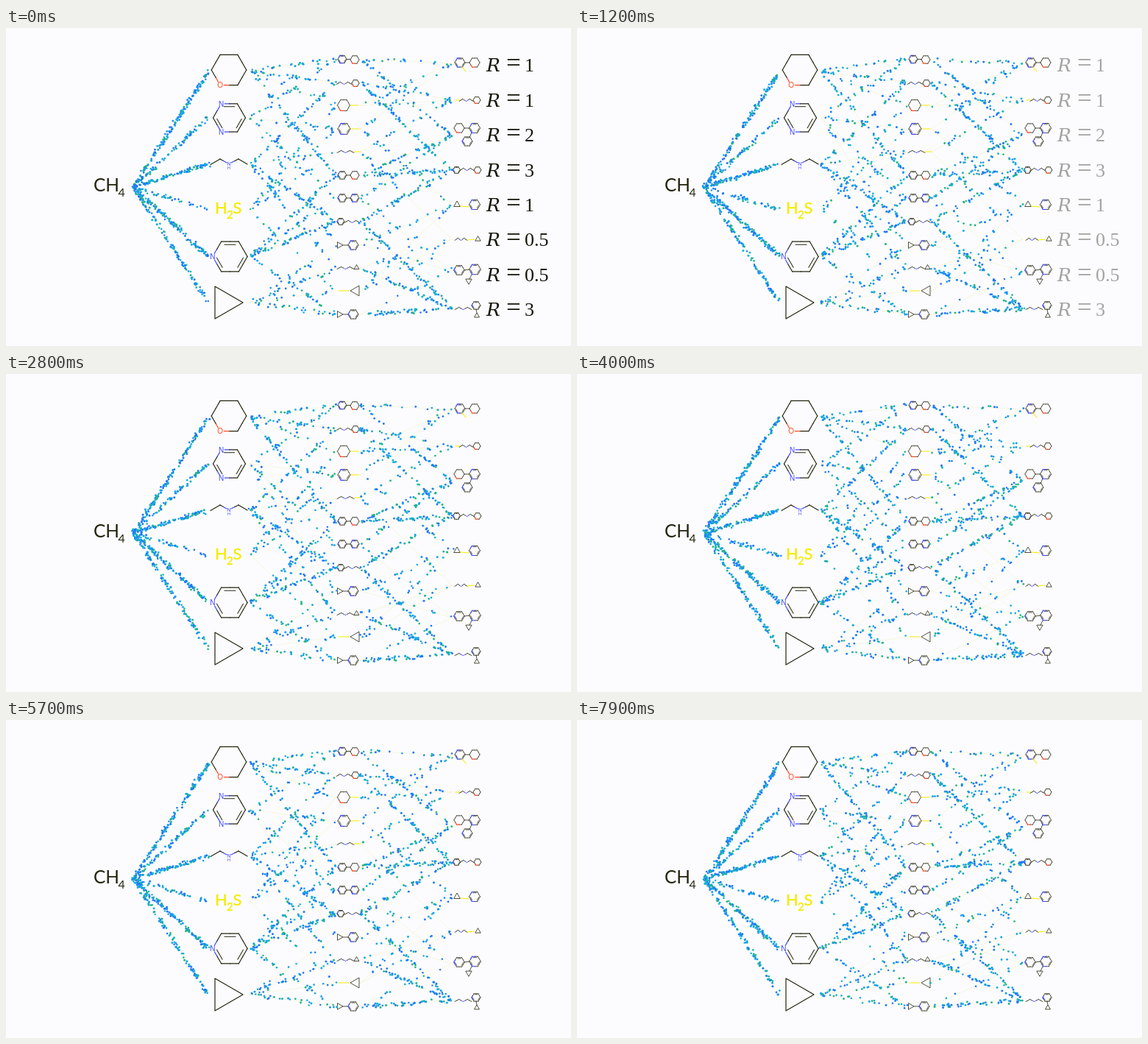
Recreate the animation shown at these times as an HTML page with a canvas. Size 768x432 px, loop 8 s.

```html
<!DOCTYPE html>
<html lang="en">
<head>
<meta charset="utf-8">
<title>Molecule flow network</title>
<style>
  html, body { margin: 0; width: 100%; height: 100%; overflow: hidden; background: #fcfcff; }
  svg, canvas { position: absolute; left: 0; top: 0; width: 768px; height: 432px; }
  .formula { font-family: Lato, "Open Sans", sans-serif; }
  .atom { font-family: "Liberation Sans", Arial, sans-serif; text-anchor: middle; }
  .reward { font-family: "Liberation Serif", Times, serif; font-size: 26px; fill: #17170c; }
  .reward .var { font-family: "DejaVu Serif", serif; font-style: italic; font-size: 25px; }
  .reward .eq { font-size: 35px; }
</style>
</head>
<body>
<svg id="scene" viewBox="0 0 768 432"></svg>
<canvas id="flow" width="768" height="432"></canvas>
<script>
const LOOP = 8000, STEP = 100, FADE = 1950;
const INK = '#25250f', BLUE = '#3b45ff', RED = '#ff4a22', YELLOW = '#f4ec00';
const DOTS = ['#1f78f5', '#1f78f5', '#129cf0', '#12a4ec', '#14b4c8', '#22b487'];

const scene = document.getElementById('scene');
const ctx = document.getElementById('flow').getContext('2d');
const parts = [];

// --- network -------------------------------------------------------------
const rewards = [1, 1, 2, 3, 1, 0.5, 0.5, 3];
const root = { x: 173, y: 216 };
const column = (ys, xin, xout) => ys.map(y => ({ y, xin, xout, flow: 0 }));
const first = column([59, 122, 185, 246, 310, 373], 275, 332);
const second = column(Array.from({ length: 12 }, (_, i) => 42.5 + i * 31.5), 448, 482);
const last = column([48, 98, 145, 193, 240, 287, 331, 381], 606, 606);
const secondParents = [[0, 1], [0, 2], [0, 3], [1, 3], [2, 3], [4, 0],
  [4, 1], [4, 2], [5, 1], [2, 5], [3, 5], [5, 4]];
const lastParents = [[0, 2, 3], [1, 2, 4], [0, 5, 6], [1, 5, 7],
  [3, 8, 10], [4, 9, 10], [6, 8, 11], [7, 9, 11]];

const edges = [];
function connect(from, to, parents) {
  to.forEach((node, i) => parents[i].forEach(p => {
    const flow = node.flow / parents[i].length;
    from[p].flow += flow;
    edges.push({ x1: from[p].xout, y1: from[p].y, x2: node.xin, y2: node.y, flow, guide: true });
  }));
}
last.forEach((node, i) => { node.flow = rewards[i]; });
connect(second, last, lastParents);
connect(first, second, secondParents);
first.forEach(n => edges.push({ x1: root.x, y1: root.y, x2: n.xin, y2: n.y, flow: n.flow }));

// --- particles -----------------------------------------------------------
let seed = 20231;
function rand() {
  seed = (seed * 1664525 + 1013904223) >>> 0;
  return seed / 4294967296;
}
const spread = size => (rand() + rand() - 1) * size;

const particles = edges.flatMap(e => {
  const length = Math.hypot(e.x2 - e.x1, e.y2 - e.y1);
  const count = Math.round(length * e.flow * 0.36);
  return Array.from({ length: count }, () => ({
    e,
    start: rand(),
    pace: (3.4 + rand() * 1.2) / length,
    dx: spread(3.6),
    dy: spread(3.6),
    r: 1.2 + rand() * 0.35,
    color: DOTS[Math.floor(rand() * DOTS.length)]
  }));
});

// --- drawing helpers -----------------------------------------------------
function line(a, b, color = INK, w = 0.8, extra = '') {
  parts.push(`<line x1="${a[0]}" y1="${a[1]}" x2="${b[0]}" y2="${b[1]}" stroke="${color}" stroke-width="${w}" stroke-linecap="round" ${extra}/>`);
}
function text(x, y, str, size, color, cls, extra = '') {
  parts.push(`<text x="${x}" y="${y}" font-size="${size}" fill="${color}" class="${cls}" ${extra}>${str}</text>`);
}
const mix = (a, b, k) => [a[0] + (b[0] - a[0]) * k, a[1] + (b[1] - a[1]) * k];

const kinds = {
  pyran: { atoms: [2], color: RED, label: 'O', doubles: [] },
  pyrimidine: { atoms: [2, 4], color: BLUE, label: 'N', doubles: [0, 2, 4] },
  pyridine: { atoms: [3], color: BLUE, label: 'N', doubles: [0, 2, 4] }
};

function ring(name, x, y, r) {
  const kind = kinds[name], big = r > 15, w = big ? 1.2 : 0.8;
  const corner = (k, s = 1) => {
    const a = k * Math.PI / 3;
    return [x + Math.cos(a) * r * s, y + Math.sin(a) * r * s];
  };
  const isAtom = k => kind.atoms.includes(k % 6);
  const half = (k, mid) => {
    const end = corner(k);
    if (isAtom(k)) line(mix(end, mid, big ? 0.44 : 0), mid, kind.color, big ? w : 1.2);
    else line(end, mid, INK, w);
  };
  for (let k = 0; k < 6; k++) {
    const mid = mix(corner(k), corner(k + 1), 0.5);
    half(k, mid);
    half(k + 1, mid);
    if (kind.doubles.includes(k)) {
      const c = corner(k, 0.8), d = corner(k + 1, 0.8);
      line(mix(c, d, 0.1), mix(c, d, 0.9), INK, w * 0.85);
    }
  }
  if (big) kind.atoms.forEach(k => {
    const [ax, ay] = corner(k);
    text(ax, ay + 3.6, kind.label, 10, kind.color, 'atom');
  });
}

const UP = -Math.PI / 2, DOWN = Math.PI / 2, LEFT = Math.PI;
function triangle(x, y, r, turn = 0) {
  const pts = [0, 1, 2].map(k => {
    const a = turn + k * Math.PI * 2 / 3;
    return `${x + Math.cos(a) * r},${y + Math.sin(a) * r}`;
  });
  parts.push(`<polygon points="${pts.join(' ')}" fill="none" stroke="${INK}" stroke-width="${r > 15 ? 1.2 : 0.8}" stroke-linejoin="round"/>`);
}

// Zigzag with a blue amine in the middle.
function chain(x1, x2, y) {
  const n = 4, at = k => [x1 + (x2 - x1) * k / n, y + (k % 2 ? -1.5 : 1.5)];
  for (let k = 0; k < n; k++) {
    const mid = mix(at(k), at(k + 1), 0.5);
    line(at(k), mid, k === 2 ? BLUE : INK);
    line(mid, at(k + 1), k === 1 ? BLUE : INK);
  }
}
const bond = (x1, y1, x2, y2) => line([x1, y1], [x2, y2]);
const sulfur = (x1, y1, x2, y2) => line([x1, y1], [x2, y2], YELLOW, 1.1);

// --- static picture ------------------------------------------------------
edges.filter(e => e.guide).forEach(e =>
  line([e.x1, e.y1], [e.x2, e.y2], '#ece99a', 0.7, 'stroke-dasharray="0.6 2.4"'));

text(119, 222, 'CH', 24.5, INK, 'formula');
text(152.5, 229, '4', 16, INK, 'formula');
const heavy = `stroke="${YELLOW}" stroke-width="0.4"`;
text(284, 252, 'H', 22, YELLOW, 'formula', heavy);
text(300, 259, '2', 15, YELLOW, 'formula', heavy);
text(308.5, 252, 'S', 22, YELLOW, 'formula', heavy);

ring('pyran', 303, 57, 23.8);
ring('pyrimidine', 303.5, 122, 22);
line([278, 185.5], [291, 178], INK, 1.2);
line([291, 178], [295.5, 180.5], INK, 1.2);
line([295.5, 180.5], [300, 183], BLUE, 1.2);
line([306, 183], [311, 180.5], BLUE, 1.2);
line([311, 180.5], [316, 178], INK, 1.2);
line([316, 178], [328, 185], INK, 1.2);
text(303, 187, 'N', 7, BLUE, 'atom');
text(303, 192, 'H', 5.5, BLUE, 'atom');
ring('pyridine', 304.5, 310.5, 23.6);
triangle(296.7, 373, 25.4);

bond(463, 42.5, 468, 42.5); ring('pyrimidine', 457, 42.5, 6); ring('pyran', 474, 43, 6);
chain(449, 470, 75); ring('pyran', 475, 75, 5);
ring('pyran', 459, 105, 8.5); sulfur(468, 105, 479, 105);
ring('pyrimidine', 459.5, 137, 8.5); sulfur(469, 137, 480, 137);
chain(450, 473, 168); sulfur(473, 168, 482, 168);
bond(463, 200, 468, 200); ring('pyridine', 457, 200, 6); ring('pyran', 474, 200, 6);
bond(463, 231, 468, 231); ring('pyridine', 457, 231, 6); ring('pyrimidine', 474, 231, 6);
ring('pyridine', 455, 263, 5); chain(460, 481, 263);
triangle(453, 295, 5); bond(458, 295, 465, 295); ring('pyrimidine', 472, 295, 7);
chain(450, 473, 326); triangle(476.5, 325.5, 4, UP);
sulfur(452, 357, 466, 357); triangle(476, 357, 8, LEFT);
triangle(453, 389, 5); bond(458, 389, 465, 389); ring('pyridine', 472, 389, 7);

bond(624, 47, 630, 47); ring('pyrimidine', 617, 47, 7); ring('pyran', 637, 47, 7); sulfur(620, 53, 625, 59);
sulfur(611, 98, 617, 98); chain(616, 635, 98); ring('pyran', 640, 98, 5);
ring('pyran', 616, 136, 7); bond(623, 136, 630, 136); ring('pyrimidine', 637, 136, 7.5);
bond(633, 142, 630, 149); ring('pyridine', 627, 154, 7);
ring('pyridine', 612.5, 193, 5); chain(617, 636, 192); ring('pyran', 641, 193, 4.8);
triangle(613, 240, 5, UP); sulfur(618, 242, 629, 243); ring('pyrimidine', 637, 240, 7.5);
chain(610, 627, 287); sulfur(627, 288, 637, 287); triangle(641.5, 287, 4.3, UP);
ring('pyridine', 616, 329, 7.2); bond(623, 329, 630, 328); ring('pyrimidine', 637.5, 328, 7.8);
bond(633, 335, 630, 341); triangle(629, 343.5, 4.8, DOWN);
chain(610, 633, 381); ring('pyridine', 639, 377, 6); bond(639, 382, 640, 387); triangle(640, 391, 4, UP);

const labels = rewards.map((r, i) => {
  const y = 59.3 + i * 47.4;
  return `<text y="${y}" class="reward"><tspan x="653" class="var">R</tspan><tspan x="680" class="eq">=</tspan><tspan x="705">${r}</tspan></text>`;
});
scene.innerHTML = parts.join('') + `<g id="rewards">${labels.join('')}</g>`;
const rewardGroup = document.getElementById('rewards');

// --- motion --------------------------------------------------------------
function draw(step) {
  rewardGroup.setAttribute('opacity', Math.max(0, 1 - step * STEP / FADE));
  ctx.clearRect(0, 0, 768, 432);
  for (const p of particles) {
    const u = (p.start + p.pace * step) % 1, e = p.e;
    ctx.fillStyle = p.color;
    ctx.beginPath();
    ctx.arc(e.x1 + (e.x2 - e.x1) * u + p.dx, e.y1 + (e.y2 - e.y1) * u + p.dy, p.r, 0, Math.PI * 2);
    ctx.fill();
  }
}

const began = performance.now();
let shown = -1;
function tick() {
  const step = Math.floor(((performance.now() - began) % LOOP) / STEP);
  if (step !== shown) draw(shown = step);
  requestAnimationFrame(tick);
}
tick();
</script>
</body>
</html>
```
